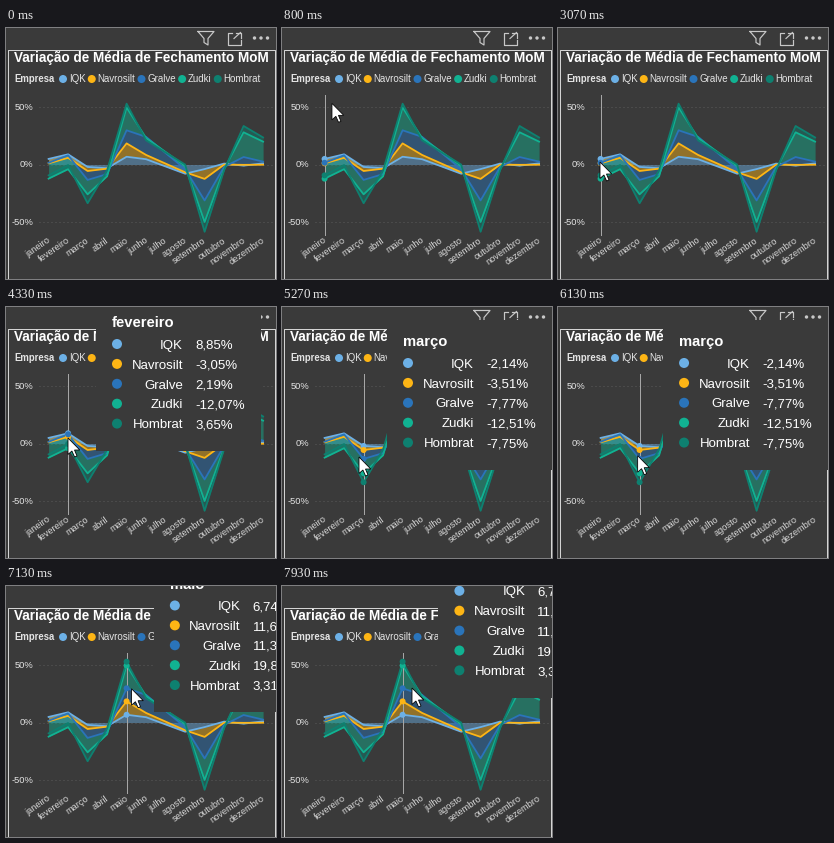
A matplotlib script for the animation above (8 s loop, 270 px wide and 251 px high).

```python
import numpy as np
import matplotlib.pyplot as plt
from matplotlib.animation import FuncAnimation
from matplotlib.patches import Circle, Polygon, Rectangle

W, H, DPI = 270, 251, 64
PT = 72 / DPI  # points per pixel
FRAMES, STEP = 200, 40

BG, LIGHT, ICON = "#3a3a3a", "#e4e4e4", "#c8c8c8"
NAMES = ["IQK", "Navrosilt", "Gralve", "Zudki", "Hombrat"]
COLORS = ["#6cb0e6", "#fdb515", "#2a74ba", "#11b292", "#0e8070"]
MONTHS = ["janeiro", "fevereiro", "março", "abril", "maio", "junho", "julho",
          "agosto", "setembro", "outubro", "novembro", "dezembro"]
MONTH_X = 42.6 + 19.5 * np.arange(12)


def ease(p):
    p = np.clip(p, 0, 1)
    return p * p * (3 - 2 * p)


def spread(first, last):
    """Values easing from the first company to the last."""
    return first + (last - first) * ease(np.linspace(0, 1, len(NAMES)))


def stacked_levels():
    """Cumulative percentages, one row per company."""
    fev = np.cumsum([8.85, -3.05, 2.19, -12.07, 3.65])
    mar = np.cumsum([-2.14, -3.51, -7.77, -12.51, -7.75])
    abr = np.cumsum([-3.25, -0.35, -4.75, -1.90, 5.16])
    mai = np.cumsum([6.74, 11.62, 11.38, 19.85, 3.31])
    jun = np.cumsum([4.6, 3.7, 15.7, -1, -2])
    nov = np.cumsum([-1, 0.7, 6.8, 21.5, 5.5])
    jan, dez = fev - spread(4, 9), nov - spread(-2, 10)
    ago, set_, out = spread(-8, 0), spread(-4, -58.5), spread(0.8, -5)
    jul = (jun + ago) / 2
    return np.array([jan, fev, mar, abr, mai, jun, jul, ago, set_, out, nov, dez]).T


def level_y(percent):
    return 136.5 - 1.15 * percent


LEVELS = stacked_levels()
LEVEL_Y = level_y(LEVELS)
CHANGES = np.diff(LEVELS, axis=0, prepend=0)

# Pointer moves: start and end time, then the place reached
ENTRY, ENTRY_TIME = (262, 236), 66
MOVES = [
    (66, 960, 35, 64), (1400, 1880, 24, 27), (2000, 2850, 57, 140),
    (2870, 3050, 42, 134), (4000, 4270, 62, 131), (5000, 5200, 77, 150),
    (6070, 6465, 109, 134), (6935, 7200, 128, 98), (7860, 7930, 130, 102),
]
ARROW = np.array([(0, 0), (0, 16.5), (3.9, 13), (6.6, 19), (9, 18),
                  (6.5, 12), (11.8, 12)])
TIP_START, TIP_LAG = 3400, 60
TIP_OFFSET = np.array([28, -137])
TIP_W, TIP_H = 165, 150


def pointer_at(t):
    place = np.array(ENTRY, float)
    for start, end, x, y in MOVES:
        place += (np.array([x, y]) - place) * ease((t - start) / (end - start))
    return place


fig = plt.figure(figsize=(W / DPI, H / DPI), dpi=DPI, facecolor=BG)
ax = fig.add_axes([0, 0, 1, 1])
ax.set_xlim(0, W)
ax.set_ylim(H, 0)
ax.axis("off")


def label(x, y, text, px, color=LIGHT, z=3, **kw):
    kw.setdefault("va", "baseline")
    return ax.text(x, y, text, fontsize=px * PT, color=color, zorder=z,
                   family="Liberation Sans", **kw)


def stroke(xs, ys, color, px=1, z=2, **kw):
    return ax.plot(xs, ys, color=color, lw=px * PT, zorder=z, **kw)[0]


def disc(x, y, r, color, z=3):
    return ax.add_patch(Circle((x, y), r, fc=color, ec="none", zorder=z))


def draw_header():
    stroke([1.5, 1.5, 268.5, 268.5], [H, 21.5, 21.5, H], "#d4d4d4")
    stroke([192, 208, 202, 202, 198, 198, 192],
           [3.5, 3.5, 10.5, 17, 14.5, 10.5, 3.5], ICON, 1.2)
    stroke([226, 221.5, 221.5, 234.5, 234.5], [5, 5, 16.5, 16.5, 12], ICON, 1.2)
    stroke([228, 234.5], [10.5, 4.5], ICON, 1.2)
    stroke([229.5, 234.5, 234.5], [4.5, 4.5, 9.5], ICON, 1.2)
    for i in range(3):
        disc(248.5 + 6.5 * i, 10, 1.7, ICON)
    label(8, 34, "Variação de Média de Fechamento MoM", 13.5, "white", weight="bold")


def draw_legend():
    label(8, 54.3, "Empresa", 9.5, weight="bold")
    x = 57
    for name, color in zip(NAMES, COLORS):
        disc(x, 51, 4, color)
        text = label(x + 6, 54.3, name, 9.8)
        x += 12 + text.get_window_extent().width


def draw_chart():
    for value in (50, 0, -50):
        y = level_y(value)
        stroke([33, 268], [y, y], "#5a5a5a", 1, 1, linestyle=(0, (1, 3)))
        label(27.5, y + 2.7, f"{value}%", 9.4, ha="right")
    for x, month in zip(MONTH_X, MONTHS):
        label(x - 2, 208, month, 9.2, "#d6d6d6", ha="right", va="top",
              rotation=35, rotation_mode="anchor")
    base = np.full(12, level_y(0))
    for top, color in zip(LEVEL_Y, COLORS):
        ax.fill_between(MONTH_X, base, top, color=color, alpha=0.45, lw=0, zorder=1.5)
        stroke(MONTH_X, top, color, 1.8)
        base = top


class Tooltip:
    def __init__(self):
        self.box = ax.add_patch(Rectangle((0, 0), TIP_W, TIP_H, fc=BG, ec="none", zorder=6))
        self.texts = []
        self.dots = []
        self.values = []
        self.title = self.add_text(16, 26.5, 14.8, weight="bold")
        for i, (name, color) in enumerate(zip(NAMES, COLORS)):
            y = 43 + 19.9 * i
            self.dots.append((disc(0, 0, 5, color, 7), 21, y))
            self.add_text(87, y + 4.7, 13.3, name, ha="right")
            self.values.append(self.add_text(99, y + 4.7, 13.3))

    def add_text(self, dx, dy, px, text="", **kw):
        item = label(0, 0, text, px, "white", 7, **kw)
        self.texts.append((item, dx, dy))
        return item

    def show(self, visible, x, y, month):
        self.box.set_visible(visible)
        self.box.set_xy((x, y))
        for text, dx, dy in self.texts:
            text.set_visible(visible)
            text.set_position((x + dx, y + dy))
        for dot, dx, dy in self.dots:
            dot.set_visible(visible)
            dot.center = (x + dx, y + dy)
        self.title.set_text(MONTHS[month])
        for item, change in zip(self.values, CHANGES[:, month]):
            item.set_text(f"{change:.2f}%".replace(".", ","))


draw_header()
draw_legend()
draw_chart()
guide = stroke([0, 0], [67, 207], "#a6a6a6", 1, 4)
markers = [disc(0, 0, 3, color, 5) for color in COLORS]
tooltip = Tooltip()
arrow = ax.add_patch(Polygon(ARROW, fc="white", ec="black", lw=0.8 * PT, zorder=9))


def update(i):
    t = (i + 0.5) * STEP
    x, y = pointer_at(t)
    month = int(np.argmin(np.abs(MONTH_X - x)))
    entered = t > ENTRY_TIME
    arrow.set_visible(entered)
    arrow.set_xy(ARROW + (x, y))

    hovering = entered and 32 <= x <= 268 and 67 <= y <= 207
    guide.set_visible(hovering)
    guide.set_xdata([MONTH_X[month]] * 2)
    for marker, level in zip(markers, LEVEL_Y[:, month]):
        marker.set_visible(hovering)
        marker.center = (MONTH_X[month], level)

    left, top = pointer_at(t - TIP_LAG) + TIP_OFFSET
    tooltip.show(t >= TIP_START, left, top, month)
    return []


anim = FuncAnimation(fig, update, frames=FRAMES, interval=STEP,
                     init_func=lambda: update(0), repeat=True, repeat_delay=0)
plt.show()
```
